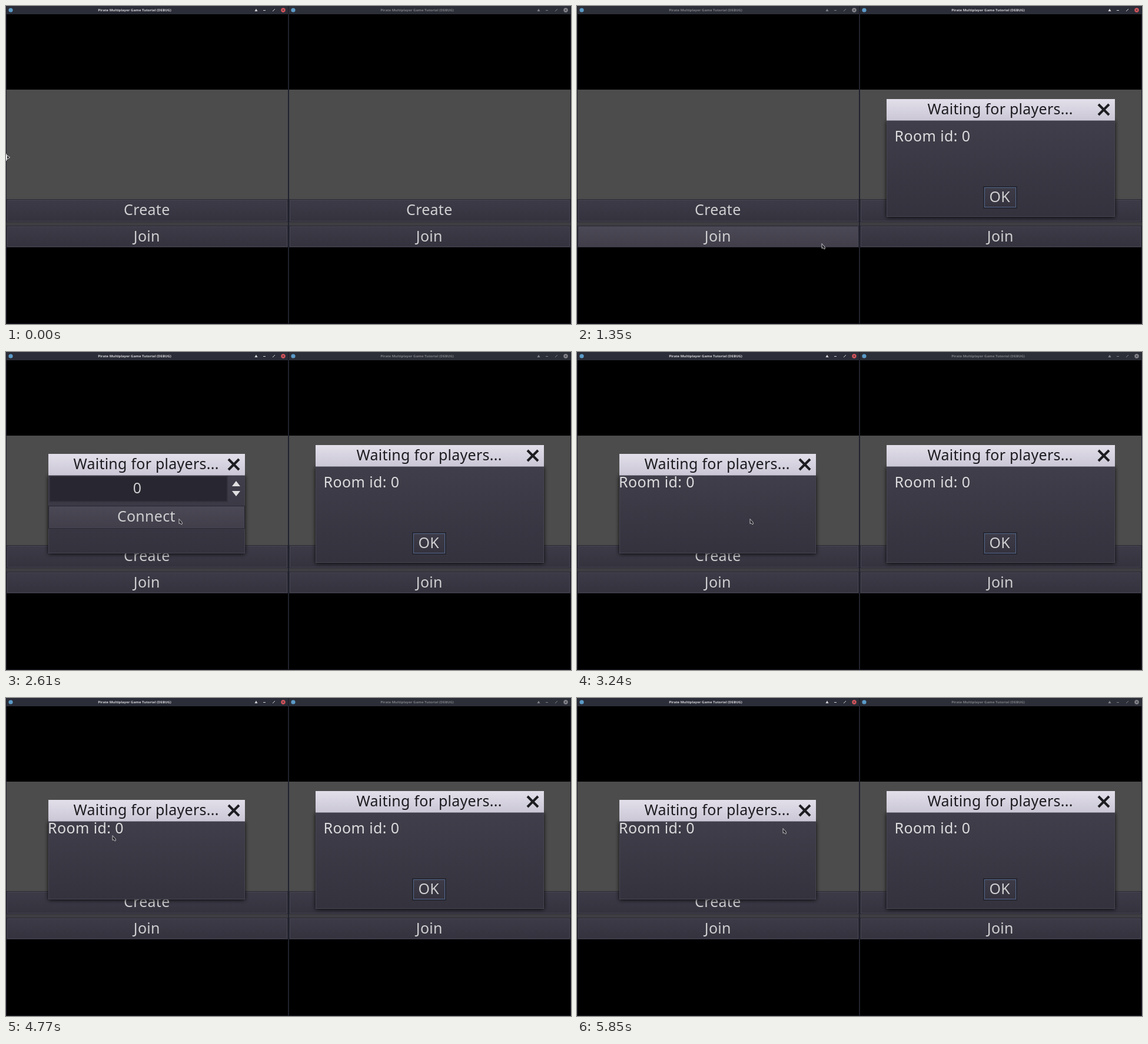
Animation of 960 by 540 pixels, one loop 5940 ms. Source, as an HTML page with a canvas:

```html
<!DOCTYPE html>
<html>
<head>
<meta charset="utf-8">
<style>
html, body { margin: 0; width: 100%; height: 100%; overflow: hidden; background: #000; }
canvas { display: block; }
</style>
</head>
<body>
<canvas id="stage" width="960" height="540"></canvas>
<script>
const ctx = document.getElementById('stage').getContext('2d');
const LOOP = 5940, STEP = 90;
const CREATED = 720, JOIN_CLICK = 1530, CONNECTED = 2880;

// Pointer path: time, x, y
const path = [
  [0, 0, 257], [540, 640, 345], [720, 640, 345], [1260, 416, 404],
  [1530, 416, 404], [1890, 294, 324], [2160, 294, 324], [2520, 294, 284],
  [3600, 294, 284], [3870, 181, 234], [5130, 181, 234], [5400, 250, 208],
  [5760, 350, 222], [LOOP, 350, 222]
];

function pointerAt(t) {
  const i = path.findIndex(p => p[0] > t);
  const [t0, x0, y0] = path[i - 1], [t1, x1, y1] = path[i];
  const k = (t - t0) / (t1 - t0), e = k * k * (3 - 2 * k);
  return [x0 + (x1 - x0) * e, y0 + (y1 - y0) * e];
}

function rect(x, y, w, h, fill) {
  ctx.fillStyle = fill;
  ctx.fillRect(x, y, w, h);
}

function shade(y, h, top, bottom) {
  const g = ctx.createLinearGradient(0, y, 0, y + h);
  g.addColorStop(0, top);
  g.addColorStop(1, bottom);
  return g;
}

function poly(points, fill, stroke, width = 1) {
  ctx.beginPath();
  points.forEach(([x, y]) => ctx.lineTo(x, y));
  ctx.closePath();
  if (fill) { ctx.fillStyle = fill; ctx.fill(); }
  if (stroke) { ctx.strokeStyle = stroke; ctx.lineWidth = width; ctx.stroke(); }
}

function line(x0, y0, x1, y1, color, width) {
  ctx.beginPath();
  ctx.moveTo(x0, y0);
  ctx.lineTo(x1, y1);
  ctx.strokeStyle = color;
  ctx.lineWidth = width;
  ctx.stroke();
}

function dot(x, y, r, fill) {
  ctx.beginPath();
  ctx.arc(x, y, r, 0, 7);
  ctx.fillStyle = fill;
  ctx.fill();
}

function text(s, x, y, color, align = 'center', font = '25px', spacing = 0.25) {
  ctx.font = font + ' "Noto Sans", "Open Sans", sans-serif';
  ctx.letterSpacing = spacing + 'px';
  ctx.textAlign = align;
  ctx.fillStyle = color;
  ctx.fillText(s, x, y);
}

function button(label, x, y, w, h, base, hover, edge = '#474552') {
  rect(x, y, w, h, '#292832');
  rect(x + 1, y + 1, w - 2, h - 2, edge);
  rect(x + 2, y + 2, w - 4, h - 4,
    hover ? shade(y, h, '#4c4956', '#413e4a') : shade(y, h, '#3d3b47', '#34323d'));
  text(label, x + w / 2 - 0.7, base, '#cfcfd1');
}

function titleBar(x, active) {
  const ink = active ? '#d4d4d8' : '#7e7f86';
  rect(x, 0, 480, 14, active ? '#2b2d38' : '#2d2f38');
  dot(x + 8, 7, 3.6, '#5b9bc8');
  text('Pirate Multiplayer Game Tutorial (DEBUG)', x + 218.5, 9, ink, 'center', 'bold 6px', 0);
  poly([[x + 425, 4.5], [x + 427.5, 9], [x + 422.5, 9]], ink);
  line(x + 437, 7.5, x + 441, 7.5, ink, 1);
  line(x + 453, 9, x + 457, 5, ink, 1);
  dot(x + 471, 7, 3.7, active ? '#d9555c' : '#85868c');
  line(x + 469.5, 5.5, x + 472.5, 8.5, '#2b2d38', 0.8);
  line(x + 472.5, 5.5, x + 469.5, 8.5, '#2b2d38', 0.8);
}

function gameWindow(x, active, hover) {
  rect(x, 142, 480, 268, '#4c4c4c');
  rect(x, 367, 480, 6, '#3e3d42');
  button('Create', x + 1, 328, 478, 39, 354.5, hover === 'create');
  button('Join', x + 1, 373, 478, 37, 399.5, hover === 'join');
  titleBar(x, active);
  rect(x, 0, 1, 540, '#20222e');
  rect(x + 479, 0, 1, 540, '#20222e');
  rect(x, 539, 480, 1, '#181a22');
}

function dialog(x, y, w, h) {
  const cx = x + w - 19, cy = y + 18, top = y + 36;
  ctx.save();
  ctx.shadowColor = 'rgba(0,0,0,.9)';
  ctx.shadowBlur = 7;
  ctx.shadowOffsetY = 1;
  rect(x, top, w, h - 36, '#474552');
  ctx.restore();
  rect(x + 1, top, w - 2, h - 37, shade(top, h - 36, '#403e4a', '#34323d'));
  rect(x, y, w, 36.5, shade(y, 36, '#e2dfea', '#cbc7d6'));
  text('Waiting for players...', x + w / 2 - 1, y + 25.5, '#1d1c20');
  line(cx - 9, cy - 9, cx + 9, cy + 9, '#1d1c20', 4);
  line(cx + 9, cy - 9, cx - 9, cy + 9, '#1d1c20', 4);
}

function roomLabel(x) {
  text('Room id: 0', x, 230, '#dcdcde', 'left', '25px', 0.4);
}

function hostDialog() {
  dialog(526, 158, 388, 200);
  roomLabel(539.5);
  rect(690, 306, 58, 38, '#25262f');
  button('OK', 691, 307, 56, 36, 332.5, false, '#53688c');
}

function joinDialog(t, hover) {
  dialog(72, 173, 334, 169);
  if (t >= CONNECTED) return roomLabel(71);
  rect(73, 210, 304, 45, '#34323d');
  rect(75, 212, 300, 41, '#282731');
  text('0', 223, 239.5, '#cfcfd1');
  poly([[391, 219], [398, 228], [384, 228]], '#e0e0e2');
  poly([[391, 245], [398, 236], [384, 236]], '#e0e0e2');
  button('Connect', 72, 261, 334, 39, 287.5, hover);
}

function pointer(t, x, y) {
  if (t < STEP) {
    line(0.5, 251, 0.5, 263, '#e8e8e8', 1);
    poly([[1.5, 253.5], [6.5, 257], [1.5, 260.5]], '#222', '#e8e8e8');
    return;
  }
  const shape = [[0, 0], [0, 8], [2, 7], [4, 9.5], [5.5, 8.5], [5, 5.5]];
  poly(shape.map(([dx, dy]) => [x + dx, y + dy - 0.5]), '#25252b', '#d4d4d6', 0.9);
}

function draw(t) {
  const [x, y] = pointerAt(t);
  const inside = (x0, y0, x1, y1) => x > x0 && x < x1 && y > y0 && y < y1;
  const hovered = x0 =>
    inside(x0, 328, x0 + 480, 367) ? 'create' : inside(x0, 373, x0 + 480, 410) ? 'join' : '';
  const hosting = t >= CREATED, joining = t >= JOIN_CLICK;
  const rightActive = t >= 630 && !joining;

  rect(0, 0, 960, 540, '#000');
  gameWindow(0, !rightActive, joining ? '' : hovered(0));
  gameWindow(480, rightActive, hosting ? '' : hovered(480));
  if (hosting) hostDialog();
  if (joining) joinDialog(t, inside(72, 261, 406, 300));
  pointer(t, x, y);
}

const start = performance.now();
function frame() {
  const t = (performance.now() - start) % LOOP;
  draw(Math.floor(t / STEP) * STEP);
  requestAnimationFrame(frame);
}
frame();
</script>
</body>
</html>
```
